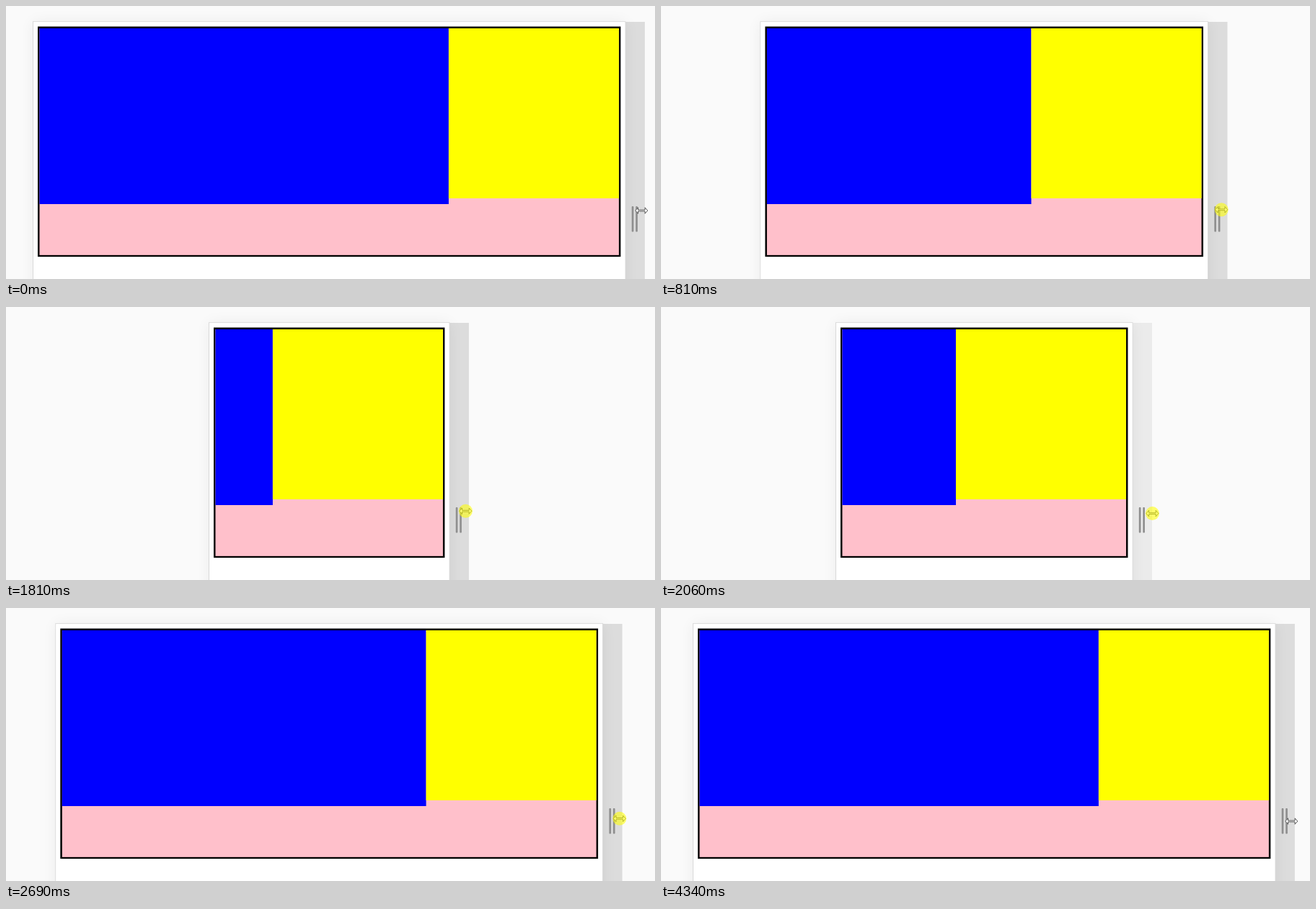
An HTML page for the animation above (4.39 s loop, 900 px wide and 379 px high).

```html
<!DOCTYPE html>
<html lang="en">
<head>
<meta charset="utf-8">
<title>Resizable layout</title>
<style>
html, body { margin: 0; width: 100%; height: 100%; overflow: hidden; background: #fafafa; }
svg { display: block; width: 100%; height: 100%; }
</style>
</head>
<body>
<svg viewBox="0 0 900 379">
  <defs>
    <filter id="soft" filterUnits="userSpaceOnUse" x="-60" y="-60" width="1020" height="560">
      <feGaussianBlur stdDeviation="10"/>
    </filter>
  </defs>
  <rect width="900" height="379" fill="#fafafa"/>
  <rect id="bar" y="22" width="27" height="400"/>
  <rect id="shade" y="22" height="420" fill="#000" opacity=".06" filter="url(#soft)"/>
  <g id="grip" fill="#8f8f8f">
    <rect x="8.8" y="278" width="2.7" height="35.5" rx="1"/>
    <rect x="14.3" y="278" width="2.7" height="35.5" rx="1"/>
  </g>
  <rect id="panel" y="21.7" height="420" fill="#fff" stroke="#d9d9d9"/>
  <rect id="page" y="22.3" height="400" fill="#fff"/>
  <rect id="box" y="28.5" height="319.6" fill="#000"/>
  <rect id="pink" y="31" height="314.8" fill="#ffc0cb"/>
  <rect id="blue" y="31" height="244" fill="#00f"/>
  <rect id="yellow" y="31" height="236" fill="#ff0"/>
  <g id="cursor">
    <path d="M-8.5 0L-4.8 -4.2V-.9H4.8V-4.2L8.5 0L4.8 4.2V.9H-4.8V4.2Z" fill="#fff" stroke="#333" stroke-width=".8"/>
    <circle id="glow" r="9.5" fill="#ff0" fill-opacity=".57"/>
  </g>
</svg>
<script>
const LOOP = 4390, STEP = 64, LATE = 37;
const SUM = 896.4; // left edge + right edge

// spans of time in which the picture repaints every STEP ms
const bursts = [[230, 750], [810, 1310], [1380, 1560], [1810, 2330], [2380, 2880], [2950, 3450], [3830, 4090]];

const left = curve([[180, 37.5], [550, 67], [750, 122], [1130, 221], [1310, 268.5], [1560, 281.5],
  [1810, 281.5], [2330, 106.5], [2380, 90], [2880, 58.5], [3334, 51.5], [4090, 44.5]]);
const height = curve([[230, 284], [1560, 281], [2330, 291], [4090, 296]]);

// smooth curve through [time, value] points that never overshoots
function curve(pts) {
  const rise = i => (pts[i + 1][1] - pts[i][1]) / (pts[i + 1][0] - pts[i][0]);
  const last = pts.length - 1;
  const slope = pts.map((_, i) => {
    if (i === 0 || i === last) return 0;
    const a = rise(i - 1), b = rise(i);
    return a * b > 0 ? 2 * a * b / (a + b) : 0;
  });
  return t => {
    if (t <= pts[0][0]) return pts[0][1];
    if (t >= pts[last][0]) return pts[last][1];
    const i = pts.findIndex(p => p[0] > t) - 1;
    const [t0, a] = pts[i], [t1, b] = pts[i + 1];
    const d = t1 - t0, u = (t - t0) / d, v = 1 - u, s = u * u * (3 - 2 * u);
    return a + (b - a) * s + d * u * v * (slope[i] * v - slope[i + 1] * u);
  };
}

// time of the latest repaint, and whether it closed a burst
function repaint(t) {
  const burst = bursts.filter(b => b[0] <= t).pop();
  if (!burst) return [0, false];
  const [a, b] = burst;
  return t >= b ? [b, true] : [a + Math.floor((t - a) / STEP) * STEP, false];
}

const parts = {};
for (const node of document.querySelectorAll('svg > [id]')) parts[node.id] = node;
const glow = document.getElementById('glow');

function span(id, a, b) {
  parts[id].setAttribute('x', a);
  parts[id].setAttribute('width', b - a);
}

function move(id, x, y) {
  parts[id].setAttribute('transform', `translate(${x} ${y})`);
}

function draw(now) {
  const time = now % LOOP, [t, closing] = repaint(time);
  const l = left(t), r = SUM - l;
  // the page inside the panel trails when a burst stops
  const p = left(closing ? t - LATE : t), q = SUM - p;
  // the pointer leads the handle and can slip off it
  const speed = (left(t + 5) - left(t - 5)) / 10;
  const lead = 22.4 - 14 * speed;

  span('shade', l, r);
  span('panel', l, r);
  span('bar', r, r + 27);
  parts.bar.setAttribute('fill', lead > 26 ? '#ebebeb' : '#dcdcdc');
  move('grip', r, 0);

  span('page', p + 0.6, q - 0.6);
  span('box', p + 6.5, q - 6.5);
  span('pink', p + 9, q - 9);
  span('blue', p + 9, q - 245);
  span('yellow', q - 245, q - 9);

  move('cursor', r + lead, height(t));
  glow.setAttribute('opacity', time < 50 || time >= 4340 ? 0 : time < 4270 ? 1 : 0.5);
}

const begin = performance.now();
function tick() {
  draw(performance.now() - begin);
  requestAnimationFrame(tick);
}
tick();
</script>
</body>
</html>
```
